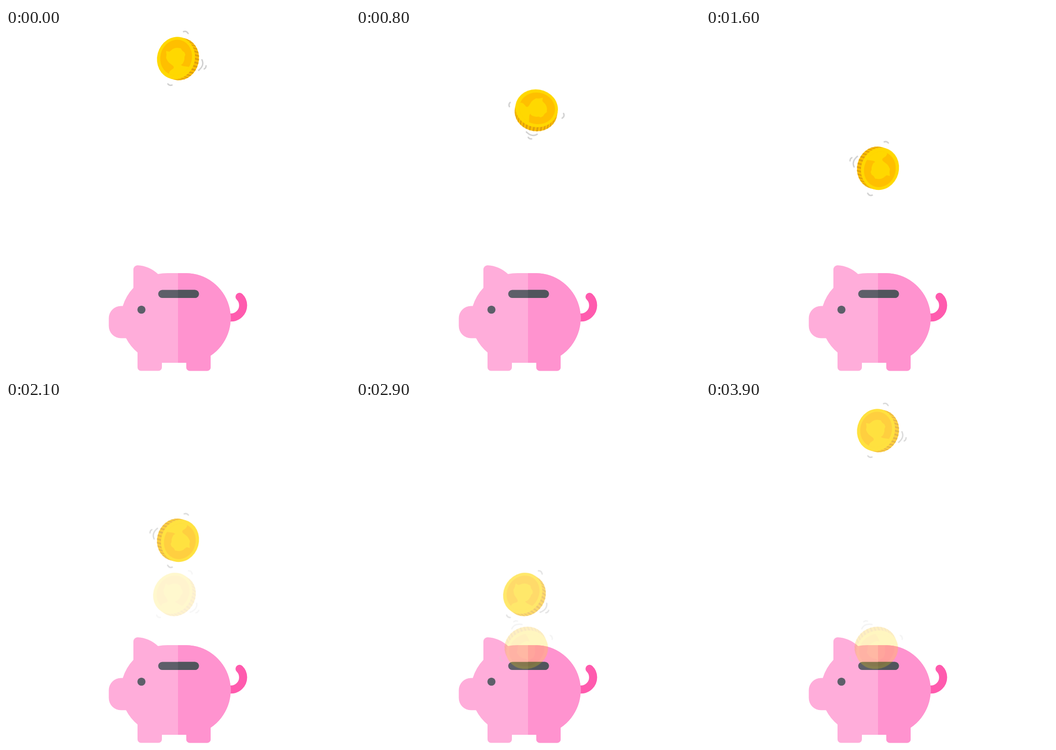
These frames come from a looping animation (748 by 748 pixels, 4000 ms). An HTML page:

```html
<!DOCTYPE html>
<html lang="en">
<head>
<meta charset="utf-8">
<title>Piggy bank</title>
<style>
  html, body { margin: 0; width: 100%; height: 100%; overflow: hidden; background: #fff; }
  svg { display: block; width: 100vw; height: 100vh; }
  .coin { opacity: 0; animation: fade 4s step-end infinite; }
  .marks { fill: none; stroke: #d0d0d0; stroke-width: 3; stroke-linecap: round; }
  /* four 100 ms steps in, 500 ms hold, four steps out */
  @keyframes fade {
    0% { opacity: .25; }
    2.5% { opacity: .5; }
    5% { opacity: .75; }
    7.5% { opacity: 1; }
    20% { opacity: .75; }
    22.5% { opacity: .5; }
    25% { opacity: .25; }
    27.5%, 100% { opacity: 0; }
  }
</style>
</head>
<body>
<svg viewBox="0 0 748 748">
  <defs>
    <clipPath id="inner"><ellipse cx="-4.5" cy="-1.2" rx="34.3" ry="39" transform="rotate(15)"/></clipPath>
    <clipPath id="right"><path d="M374 500H540V748H374Z"/></clipPath>
    <path id="body" d="M392 533A98 98 0 0 1 445 712.5V738A7.5 7.5 0 0 1 437.500 745.500H399.500A7.500 7.500 0 0 1 392 738V728H339V738A7.500 7.500 0 0 1 331.500 745.500H293.500A7.500 7.500 0 0 1 286 738V705.500A98 98 0 0 1 261 674.500H250A26.500 26.500 0 0 1 223.500 648V631A26.500 26.500 0 0 1 250 604.500H254A98 98 0 0 1 277 565V525A9 9 0 0 1 286 516Q311 517 330.500 535Q340 533 351 533Z"/>
    <rect id="slot" x="331" y="569.5" width="88.500" height="17.500" rx="8.750"/>
    <g id="coin">
      <g transform="rotate(15)">
        <g fill="#ffbf00">
          <ellipse cx="4.500" rx="41" ry="46.300"/>
          <path d="M-4.500 -46.300h9v92.600h-9z"/>
        </g>
        <path id="ridges" fill="#dc9e0c"/>
        <ellipse cx="-4.500" rx="41" ry="46.300" fill="#ffd800"/>
        <ellipse cx="-4.500" cy="-1.200" rx="34.300" ry="39" fill="#ffbf00"/>
      </g>
      <g clip-path="url(#inner)">
        <path transform="translate(-374 -66.500)" fill="#ffd800" d="M348 50L355 51.500Q359 49 362 46Q367 43 372 43L380 44L383 49L388 53L390 58L388 63L388 68L386 74Q384 79 380 80Q383 83 390 83.500L401 85L415 115H350L355 103Q353 98 357 93Q361 90 364 88Q366 85 363 82L354 75L351 71L348 65L349 58Z"/>
      </g>
      <path class="marks" transform="translate(-374 -66.500)" d="M386 8Q392 5.500 396 12M426 69Q432 81 419 92M435 82Q435 87 431 89M352 121.500Q355 126 361 124"/>
    </g>
  </defs>

  <path d="M484 629.500H489A26.600 26.500 0 0 0 515.600 603Q515.600 592 507.800 584.500" fill="none" stroke="#ff5bae" stroke-width="17.500" stroke-linecap="round"/>
  <use href="#body" fill="#ffadda"/>
  <use href="#body" fill="#ff93cf" clip-path="url(#right)"/>
  <use href="#slot" fill="#5d5f69"/>
  <use href="#slot" fill="#51555d" clip-path="url(#right)"/>
  <circle cx="294.500" cy="612.500" r="8.800" fill="#5d5f69"/>
  <g id="coins"></g>
</svg>
<script>
  // ridges: slices of the rim between the front and back ellipses
  const rim = a => [4.5 + 41 * Math.cos(a), 46.3 * Math.sin(a)];
  let d = '';
  for (let deg = -84; deg < 84; deg += 10) {
    const [x1, y1] = rim(deg * Math.PI / 180);
    const [x2, y2] = rim((deg + 4.5) * Math.PI / 180);
    d += `M${x1} ${y1}L${x2} ${y2}H${x2 - 9}L${x1 - 9} ${y1}Z`;
  }
  document.getElementById('ridges').setAttribute('d', d);

  // x, y, turn, strength
  const poses = [
    [374, 66.5, 0, 1],
    [392, 179, 85, 1],
    [374, 305, 180.5, 1],
    [366.3, 422.8, 19, 0.78],
    [370.3, 539, 230, 1]
  ];
  document.getElementById('coins').innerHTML = poses.map(([x, y, turn, alpha], i) =>
    `<g opacity="${alpha}"><g class="coin" style="animation-delay:${i ? i * 800 - 4300 : -300}ms">
      <use href="#coin" transform="translate(${x} ${y}) rotate(${turn})"/></g></g>`).join('');
</script>
</body>
</html>
```
